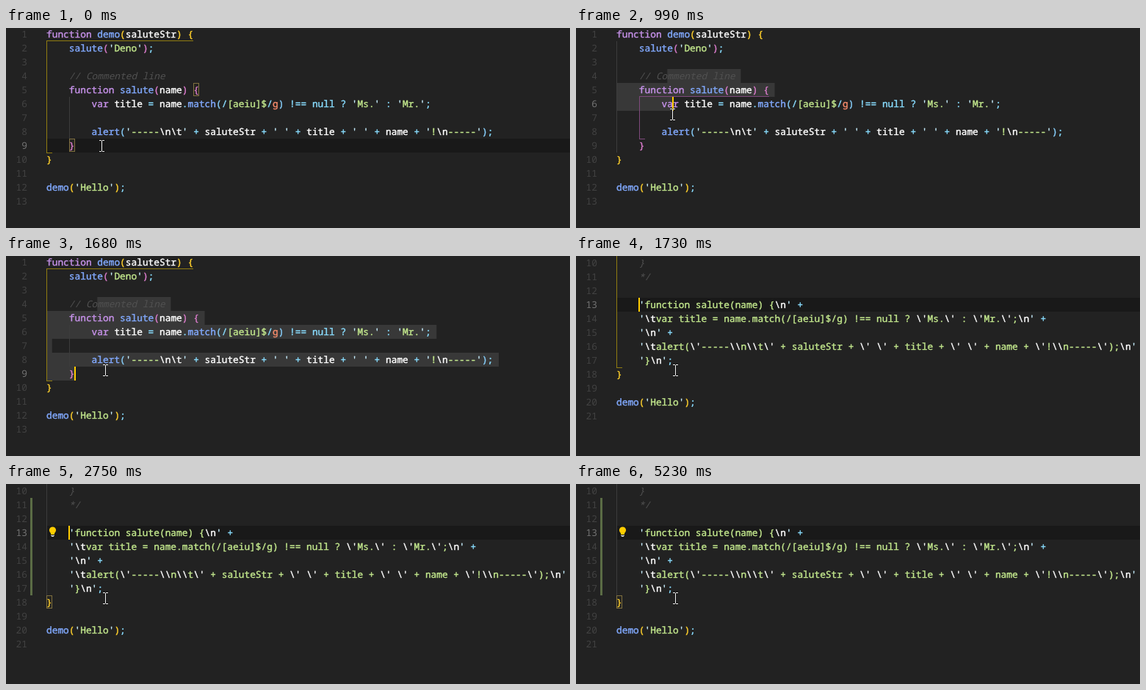
Write an HTML page with a canvas that moves like this. It is 768x273 px and loops after 5640 ms.

```html
<!DOCTYPE html>
<html lang="en">
<head>
<meta charset="utf-8">
<title>Commenting out a function</title>
<style>
html, body { margin: 0; width: 100%; height: 100%; overflow: hidden; background: #222; }
canvas { display: block; }
</style>
</head>
<body>
<canvas id="stage" width="768" height="273"></canvas>
<script>
const ctx = document.getElementById('stage').getContext('2d');
const LOOP = 5640, W = 768, H = 273;
const LEFT = 55, CHAR = 7.7, ROW = 19, BASE = 14;
const FONT = '500 12.833px "Noto Sans Mono", "DejaVu Sans Mono", monospace';

const COLOR = {
  back: '#222222', row: '#191919', select: '#383838', guide: '#3c3c3c',
  number: '#424242', active: '#737373', caret: '#ffcc00',
  plain: '#ffffff', keyword: '#c792ea', call: '#82aaff', op: '#89ddff',
  string: '#c3e88d', quote: '#c8efff', escape: '#ffffff', flag: '#f78c6c',
  comment: '#515151', match: '#80703f', matchFill: '#252421', added: '#5b6c45',
  outer: '#907c11', inner: '#7e497c'
};
const BRACKETS = ['#ffd02c', '#da7ccb', '#87cefa'];

const before = String.raw`function demo(saluteStr) {
    salute('Deno');

    // Commented line
    function salute(name) {
        var title = name.match(/[aeiu]$/g) !== null ? 'Ms.' : 'Mr.';

        alert('-----\n\t' + saluteStr + ' ' + title + ' ' + name + '!\n-----');
    }
}

demo('Hello');
`.split('\n');

const after = String.raw`    }
    */

    'function salute(name) {\n' +
    '\tvar title = name.match(/[aeiu]$/g) !== null ? \'Ms.\' : \'Mr.\';\n' +
    '\n' +
    '\talert(\'-----\\n\\t\' + saluteStr + \' \' + title + \' \' + name + \'!\\n-----\');\n' +
    '}\n';
}

demo('Hello');
`.split('\n');

const TOKEN = /(?<comment>\/\/.*)|(?<string>'(?:\\.|[^'\\])*')|(?<regex>\/\[\w+\]\$\/g)|(?<keyword>\b(?:function|var)\b)|(?<op>\bnull\b|[=!?:+.;]+)|(?<call>\w+(?=\())|(?<plain>\w+)|(?<bracket>[(){}])/g;

// Splits lines into coloured pieces placed on the character grid.
function highlight(lines, depth, inComment) {
  return lines.map(line => {
    const out = [];
    const add = (text, col, color, italic = false) => out.push({ text, col, color, italic });
    if (inComment) {
      const col = line.search(/\S/);
      if (col >= 0) add(line.trim(), col, COLOR.comment, true);
      if (line.includes('*/')) inComment = false;
      return out;
    }
    for (const m of line.matchAll(TOKEN)) {
      const kind = Object.keys(m.groups).find(k => m.groups[k] !== undefined);
      const text = m[0], col = m.index;
      if (kind === 'bracket') {
        if (/[)}]/.test(text)) depth--;
        add(text, col, BRACKETS[depth % 3]);
        if (/[({]/.test(text)) depth++;
      } else if (kind === 'string') {
        for (const p of text.matchAll(/\\.|'|[^\\']+/g)) {
          const color = p[0] === "'" ? COLOR.quote : p[0][0] === '\\' ? COLOR.escape : COLOR.string;
          add(p[0], col + p.index, color);
        }
      } else if (kind === 'regex') {
        for (const p of text.matchAll(/\[\w+\]|./g)) {
          const color = /[[$]/.test(p[0]) ? COLOR.string : p[0] === 'g' ? COLOR.flag : COLOR.op;
          add(p[0], col + p.index, color);
        }
      } else {
        add(text, col, COLOR[kind], kind === 'comment');
      }
    }
    return out;
  });
}

const beforeTokens = highlight(before, 0, false);
const afterTokens = highlight(after, 1, true);

const colX = col => LEFT + col * CHAR;

function rect(color, x, y, w, h) {
  ctx.fillStyle = color;
  ctx.fillRect(x, y, w, h);
}

// A hairline stroke gives the code its firmer weight.
function drawText(tokens) {
  ctx.lineWidth = 0.4;
  ctx.lineJoin = 'round';
  tokens.forEach((line, row) => line.forEach(t => {
    const x = colX(t.col), y = row * ROW + BASE;
    ctx.font = (t.italic ? 'italic ' : '') + FONT;
    ctx.fillStyle = ctx.strokeStyle = t.color;
    ctx.fillText(t.text, x, y);
    if (!t.italic) ctx.strokeText(t.text, x, y);
  }));
}

function drawNumbers(first, count, activeRow) {
  ctx.font = FONT;
  for (let i = 0; i < count; i++) {
    const label = String(first + i);
    ctx.fillStyle = i === activeRow ? COLOR.active : COLOR.number;
    ctx.fillText(label, 29 - label.length * CHAR, i * ROW + BASE);
  }
}

function drawScope(color, x, top, bottom, headEnd) {
  if (headEnd) rect(color, x, top, headEnd - x, 1);
  rect(color, x, top, 1, bottom - top);
  rect(color, x, bottom, 8, 1);
}

function drawMatch(col, row) {
  const x = Math.round(colX(col)), y = row * ROW;
  rect(COLOR.match, x, y, 8, ROW - 1);
  rect(COLOR.matchFill, x + 1, y + 1, 6, ROW - 3);
}

function drawCaret(x, row) {
  rect(COLOR.caret, x, row * ROW, 2, ROW);
}

function drawBeam({ x, y }) {
  x = Math.round(x);
  y = Math.round(y);
  const part = (color, grow) => {
    const bar = (dx, dy, w, h) => rect(color, x + dx - grow, y + dy - grow, w + 2 * grow, h + 2 * grow);
    bar(0, 0, 3, 1);
    bar(4, 0, 3, 1);
    bar(3, 1, 1, 14);
    bar(0, 15, 3, 1);
    bar(4, 15, 3, 1);
  };
  part('rgba(0,0,0,0.35)', 0.5);
  part('#f4f4f4', 0);
}

function drawBulb() {
  ctx.fillStyle = '#ffcc00';
  ctx.beginPath();
  ctx.arc(63.5, 63, 4.6, 0, Math.PI * 2);
  ctx.fill();
  rect('#ffcc00', 61, 66, 5, 3);
  rect('#c9c9c9', 61, 70, 5, 1);
  rect('#c9c9c9', 62, 71, 3, 1);
}

const mix = (a, b, p) => a + (b - a) * p;
const span = (t, a, b) => Math.min(1, Math.max(0, (t - a) / (b - a)));

// Top left corner of the mouse beam.
function mouse(t) {
  if (t < 660) {
    const p = span(t, 10, 610), e = p * p * (3 - 2 * p);
    return { x: mix(127, 124, e) - 18 * e * (1 - e), y: mix(153, 60, e) };
  }
  if (t < 990) {
    const p = span(t, 690, 990);
    return { x: mix(124, 128, p), y: mix(60, 110, p) };
  }
  const p = span(t, 990, 1200);
  return { x: mix(128, 132, p), y: t < 1430 ? mix(110, 147, p) : 148 };
}

const ANCHOR = { row: 3, col: 9 };

// The selection trails the mouse a little.
function caretAt(t) {
  if (t < 660) return { row: 8, col: 5 };
  const m = mouse(Math.max(660, t - 60));
  const row = Math.floor((m.y + 8) / ROW);
  const col = Math.min(before[row].length, Math.round((m.x + 3.5 - LEFT) / CHAR));
  return { row, col };
}

function drawSelection(end) {
  for (let row = ANCHOR.row; row <= end.row; row++) {
    const from = row === ANCHOR.row ? colX(ANCHOR.col) : LEFT;
    const to = row === end.row ? colX(end.col) : colX(before[row].length + 1);
    rect(COLOR.select, from, row * ROW, to - from, ROW);
  }
}

function drawBefore(t) {
  const caret = caretAt(t);
  const clicked = t >= 660;
  const selecting = clicked && caret.row > ANCHOR.row;
  const inside = caret.row >= 5 && caret.row <= 7;

  ctx.save();
  ctx.translate(0, -1); // this view is scrolled by one pixel
  if (selecting) drawSelection(caret);
  else rect(COLOR.row, LEFT, caret.row * ROW, W - LEFT, ROW);

  rect(COLOR.guide, LEFT, ROW, 1, 8 * ROW);
  rect(COLOR.guide, 86, 5 * ROW, 1, 3 * ROW);
  if (inside) drawScope(COLOR.inner, 86, 5 * ROW - 1, 8 * ROW, 263);
  else drawScope(COLOR.outer, LEFT, ROW - 1, 9 * ROW, 255);

  if (!clicked) {
    drawMatch(26, 4);
    drawMatch(4, 8);
  }
  drawNumbers(1, 13, caret.row);
  drawText(beforeTokens);
  if (clicked) drawCaret(Math.round(colX(caret.col)) - 1, caret.row);
  ctx.restore();
}

const BLINKS = [2220, 2750, 3250, 3710, 4240, 4700, 5230];

function drawAfter(t) {
  rect(COLOR.row, LEFT, 3 * ROW, W - LEFT, ROW);
  rect(COLOR.guide, LEFT, 0, 1, 8 * ROW);
  if (t < 1860) drawScope(COLOR.outer, LEFT, 0, 8 * ROW);
  else drawMatch(0, 8);
  if (t >= 1990) {
    rect(COLOR.added, 33, ROW, 3, 7 * ROW);
    drawBulb();
  }
  drawNumbers(10, 12, 3);
  drawText(afterTokens);
  if (BLINKS.filter(b => t >= b).length % 2 === 0) drawCaret(85, 3);
}

function draw(t) {
  rect(COLOR.back, 0, 0, W, H);
  ctx.textBaseline = 'alphabetic';
  ctx.textRendering = 'geometricPrecision';
  if (t < 1730) drawBefore(t);
  else drawAfter(t);
  drawBeam(mouse(t));
}

const start = performance.now();
function tick() {
  draw((performance.now() - start) % LOOP);
  requestAnimationFrame(tick);
}
tick();
</script>
</body>
</html>
```
